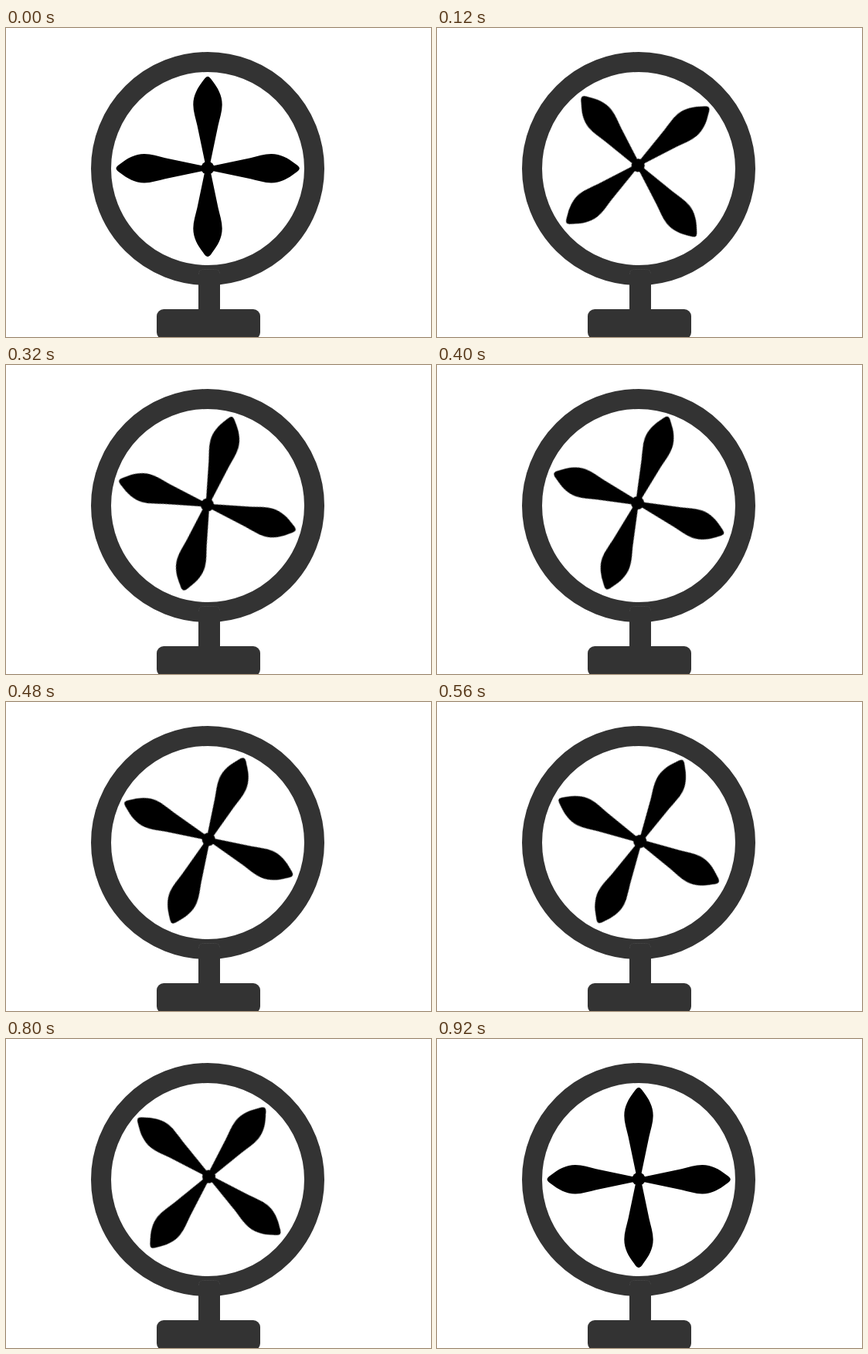
An HTML page for the animation above (0.96 s loop, 550 by 400 pixels).

```html
<!DOCTYPE html>
<html lang="en">
<head>
<meta charset="utf-8">
<title>Fan</title>
<style>
  html, body { margin: 0; width: 100%; height: 100%; overflow: hidden; background: #fff; }
  svg { display: block; width: 550px; height: 400px; }
  /* Three turns in 24 poses; the last pose equals the first. */
  .rotor {
    transform-origin: 261.2px 179.4px;
    animation: spin 960ms steps(24, jump-none) infinite;
  }
  @keyframes spin {
    from { transform: rotate(0deg); }
    to { transform: rotate(1080deg); }
  }
</style>
</head>
<body>
<svg viewBox="0 0 550 400">
  <defs>
    <path id="blade" d="M0-118.5C-2-118.5-4-116-6-113C-13-104-18.7-94-18.7-82C-18.7-73-15.5-64-13.5-55L-2 0H2L13.5-55C15.5-64 18.7-73 18.7-82C18.7-94 13-104 6-113C4-116 2-118.5 0-118.5Z"/>
  </defs>
  <g fill="#333">
    <circle cx="261" cy="182" r="138" fill="none" stroke="#333" stroke-width="26"/>
    <rect x="249" y="312" width="28" height="60" rx="6"/>
    <rect x="195" y="364" width="134" height="39" rx="9"/>
    <path d="M249.5 318.5Q249.5 312.5 255.5 312.5H270.5Q276.5 312.5 276.5 318.5" fill="none" stroke="#4c4c4c" stroke-dasharray="1 1"/>
  </g>
  <g class="rotor">
    <use href="#blade" transform="translate(261 181.3)"/>
    <use href="#blade" transform="translate(261.3 181.8) rotate(90)"/>
    <use href="#blade" transform="translate(261 177.6) rotate(180)"/>
    <use href="#blade" transform="translate(261 181.8) rotate(270)"/>
    <circle cx="261" cy="181.3" r="8.5"/>
  </g>
</svg>
</body>
</html>
```
